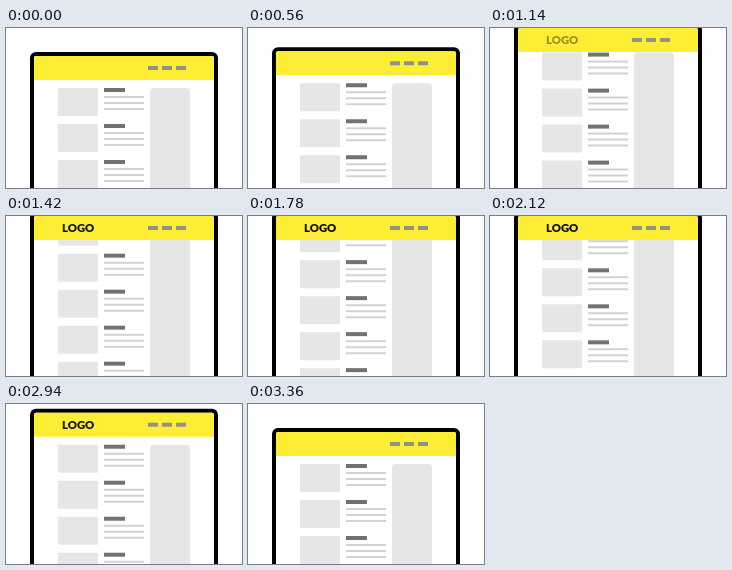
Animation, 236 px wide and 160 px high, one loop 3.4 s. Source, as an HTML page with a canvas:

```html
<!DOCTYPE html>
<html lang="en">
<head>
<meta charset="utf-8">
<title>Sticky header scroll</title>
<style>
  html, body { margin: 0; width: 100%; height: 100%; overflow: hidden; background: #fff; }
  canvas { display: block; width: 236px; height: 160px; }
</style>
</head>
<body>
<canvas id="stage" width="236" height="160"></canvas>
<script>
const ctx = document.getElementById('stage').getContext('2d');
const LOOP = 3400, STEP = 20;
const STICK = 28;        // scroll distance at which the header sticks
const PEAK = 97.7;

// [time in ms, scroll offset in px]
const SCROLL = [[460, 0], [1050, STICK], [1900, PEAK], [2750, STICK], [3360, 0]];

const progress = (t, from, to) => Math.min(1, Math.max(0, (t - from) / (to - from)));

function scrollAt(t) {
  let y = 0;
  for (let i = 1; i < SCROLL.length; i++) {
    const [t0, y0] = SCROLL[i - 1], [t1, y1] = SCROLL[i];
    y += (y1 - y0) * progress(t, t0, t1);
  }
  return y;
}

function logoAlpha(t) {
  const fadeIn = 1 - (1 - progress(t, 1050, 1600)) ** 3;
  const fadeOut = progress(t, 2760, 3340) ** 3;
  return fadeIn * (1 - fadeOut);
}

function box(x, y, w, h, color, radius = 0) {
  ctx.fillStyle = color;
  ctx.beginPath();
  ctx.roundRect(x, y, w, h, radius);
  ctx.fill();
}

function drawArticle(y) {
  box(52, y, 40, 28, '#e6e6e6', 1);
  box(98, y, 21, 4, '#73736e');
  for (let i = 0; i < 3; i++) box(98, y + 8 + i * 6, 40, 2, '#d2d2d2');
}

function drawHeader(y, alpha) {
  box(28, y, 180, 24, '#fdee35', [2, 2, 0, 0]);
  for (let i = 0; i < 3; i++) box(142 + i * 14, y + 10, 10, 4, '#929284');
  ctx.globalAlpha = alpha;
  ctx.fillStyle = '#0c0c10';
  ctx.font = '900 11.3px Lato, sans-serif';
  ctx.fillText('LOGO', 56, y + 16.2);
  ctx.globalAlpha = 1;
}

function draw(t) {
  const scroll = scrollAt(t);
  const top = STICK - Math.min(scroll, STICK);

  box(0, 0, 236, 160, '#fff');
  box(24, top - 4, 188, 220, '#000', 6);
  box(28, top, 180, 220, '#fff', 2);
  box(144, 60 - scroll, 40, 300, '#e6e6e6', 4);
  for (let y = 60 - scroll; y < 160; y += 36) drawArticle(y);

  // Cover content that has passed beneath the header's rounded corners.
  drawHeader(top, logoAlpha(t));
}

function tick() {
  const t = performance.now() % LOOP;
  draw(Math.floor(t / STEP) * STEP);
  requestAnimationFrame(tick);
}
tick();
</script>
</body>
</html>
```
